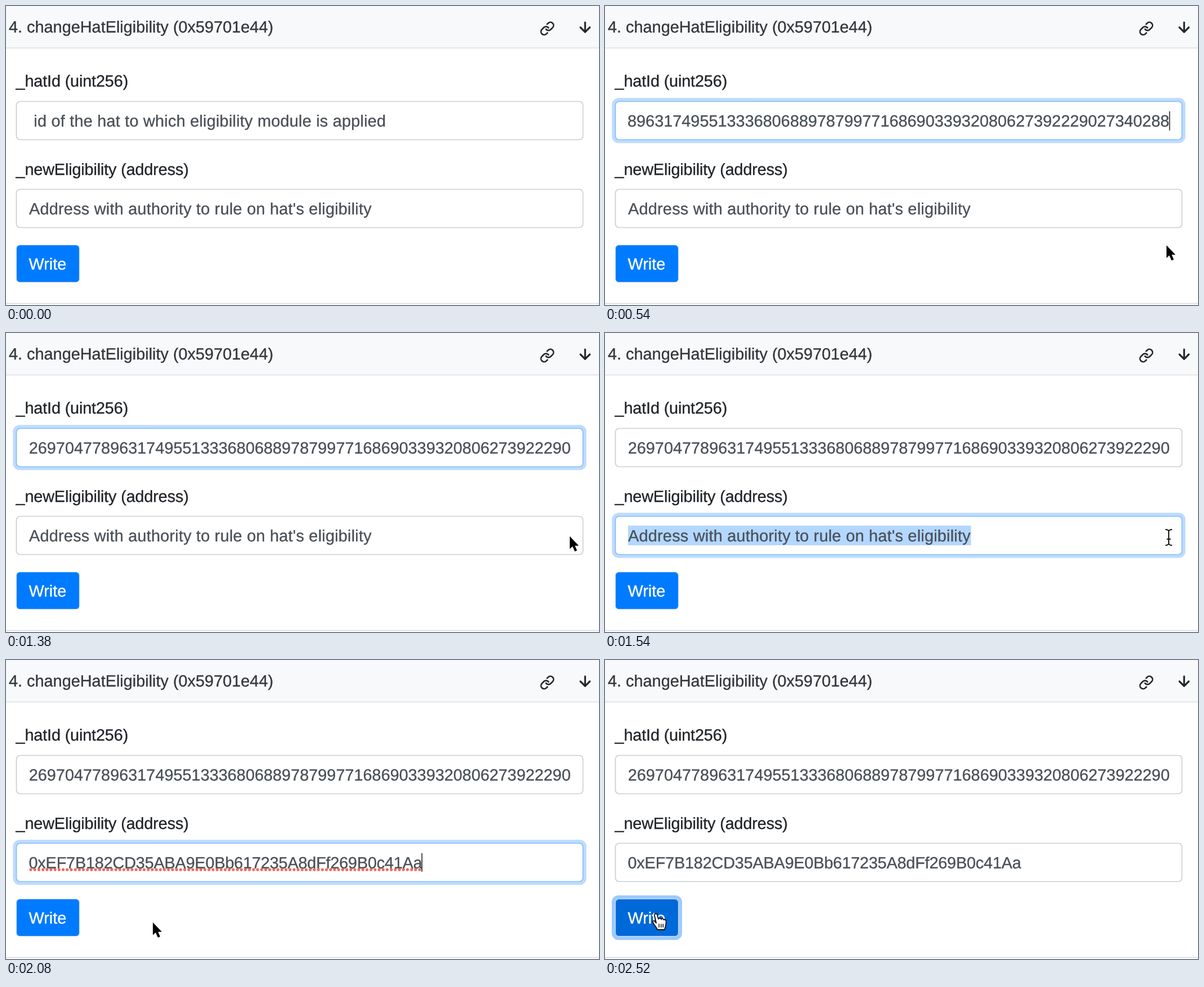
An HTML page that plays this animation: 1054x531 px, repeating every 2.66 s.

```html
<!DOCTYPE html>
<html lang="en">
<head>
<meta charset="utf-8">
<title>changeHatEligibility</title>
<style>
  html, body { margin: 0; width: 100%; height: 100%; overflow: hidden; background: #fff; }
  svg { display: block; }
  text {
    font: 28.87px "Liberation Sans", Arial, sans-serif;
    color: #212529; fill: currentColor; stroke: currentColor; stroke-width: .35;
    white-space: pre; text-rendering: geometricPrecision;
  }
  .title { color: #33373b; }
  .label { letter-spacing: -.16px; }
  .value, .hint, .hex { color: #495057; }
  .hint { letter-spacing: .225px; }
  .hex { letter-spacing: -.2px; }
  .write { color: #fff; }
  .icon { fill: none; stroke: #24282c; stroke-linecap: round; stroke-linejoin: round; }
  .box { fill: #fff; stroke: #cbced2; stroke-width: 1.7; }
  .box.on { stroke: #80bdff; }
  .ring { fill: #bfdbfd; }
  .mark { fill: #b3d7ff; }
  .caret { stroke: #222; stroke-width: 1.6; }
  .off { display: none; }
</style>
</head>
<body>
<svg width="1054" height="531" viewBox="0 0 1054 531">
  <defs>
    <path id="beamLine" d="M-6-14q5 0 6 3q1-3 6-3M-6 14q5 0 6-3q1 3 6 3M0-11V11M-3.5 3H3.5"/>
  </defs>
  <rect width="1054" height="74" fill="#f8f9fb"/>
  <path d="M0 74.5H1054M0 528.3H1054" stroke="#dcdddf" stroke-width="1.7"/>
  <text class="title" x="5" y="46.5">4. changeHatEligibility (0x59701e44)</text>
  <g class="icon" transform="translate(948.6 26.6) scale(1.12)" stroke-width="2.4">
    <path d="M10 13a5 5 0 0 0 7.54.54l3-3a5 5 0 0 0-7.07-7.07l-1.72 1.71M14 11a5 5 0 0 0-7.54-.54l-3 3a5 5 0 0 0 7.07 7.07l1.71-1.71"/>
  </g>
  <path class="icon" d="M1029.3 29V46M1021 38l8.3 8.3 8.3-8.3" stroke-width="3.2"/>

  <text class="label" x="17.5" y="143">_hatId (uint256)</text>
  <rect id="ring1" class="ring" x="12.3" y="163.3" width="1019.4" height="80.2" rx="12"/>
  <rect id="box1" class="box" x="18.5" y="169.5" width="1007" height="68" rx="6.5"/>
  <rect id="mark1" class="mark" x="41" y="186.5" width="635" height="34.5"/>
  <text id="hint1" class="hint" x="41" y="214"> id of the hat to which eligibility module is applied</text>
  <svg x="40" y="170" width="964.5" height="67">
    <text id="head" class="value" x=".7" y="44"></text>
    <text id="tail" class="value" x="963" y="44" text-anchor="end"></text>
  </svg>
  <path id="caret1" class="caret" d="M1003.5 187V221"/>

  <text class="label" x="17.5" y="299.5">_newEligibility (address)</text>
  <rect id="ring2" class="ring" x="12.3" y="319.3" width="1019.4" height="80.2" rx="12"/>
  <rect id="box2" class="box" x="18.5" y="325.5" width="1007" height="68" rx="6.5"/>
  <rect id="mark2" class="mark" x="41" y="342" width="609.5" height="35"/>
  <text id="hint2" class="hint" x="41" y="369.5">Address with authority to rule on hat's eligibility</text>
  <text id="hex" class="hex" x="40.5" y="369.5">0xEF7B182CD35ABA9E0Bb617235A8dFf269B0c41Aa</text>
  <g id="spell">
    <path d="M44 372.3H737" stroke="#f4695f" stroke-width="5.2" stroke-linecap="round" stroke-dasharray="0 7.2"/>
    <path class="caret" d="M739.3 343V376"/>
  </g>

  <rect id="ring3" x="12" y="418" width="125" height="79.3" rx="12" fill="#9dcaff"/>
  <rect id="button" x="18.5" y="424.5" width="112" height="66.2" rx="6" stroke="#c9dcf0" stroke-width="1.2"/>
  <text class="write" x="40.5" y="468">Write</text>

  <path id="arrow" d="M0 0V22.5L5 18 9 27 13 25.3 9.2 16.7H16Z" stroke="#fff" stroke-width="3" paint-order="stroke"/>
  <g id="beam" fill="none">
    <use href="#beamLine" stroke="#fff" stroke-width="4"/>
    <use href="#beamLine" stroke="#111" stroke-width="2"/>
  </g>
  <g id="hand" fill="#fff" stroke="#111" stroke-width="1.8" stroke-linejoin="round">
    <path d="M-3 3C-4-1 1-2 2 2L4 9C5 7 8 7 9 9.5 10 7.5 13 8 13.5 10.5 15 9.5 17.5 10 17.5 13 18 20 16 22 15 28H2C1 24-4 19-6 15-7 12-4 11-2 14L0 16Z"/>
    <path d="M5 17.5v6.5M8.7 17.5v6.5M12.3 17.5v6.5" stroke-width="1.5"/>
  </g>
</svg>
<script>
const LOOP = 2660;
const $ = id => document.getElementById(id);
const show = (id, on) => $(id).classList.toggle('off', !on);

// 68 digits: the field shows the first or the last 60
$('head').textContent = $('tail').textContent =
  '269704778963174955133368068897' + '879977168690339320806273922290' + '27340288';

// time, focus (1, 2 = fields, 3 = button), hat field, address field, cursor, x, y
const steps = [
  [0, 0, 'hint', 'hint'],
  [80, 0, 'hint', 'hint', 'arrow', 1031, 440],
  [160, 0, 'hint', 'hint', 'arrow', 1018, 310],
  [230, 1, 'hint', 'hint', 'beam', 1009, 213],
  [310, 1, 'marked', 'hint', 'beam', 1009, 213],
  [460, 1, 'tail', 'hint', 'beam', 1009, 213],
  [540, 1, 'tail', 'hint', 'arrow', 998, 425],
  [620, 1, 'tail', 'hint'],
  [770, 0, 'head', 'hint'],
  [850, 1, 'head', 'hint', 'arrow', 1010, 130],
  [920, 1, 'head', 'hint', 'arrow', 1006, 330],
  [1230, 1, 'head', 'hint', 'arrow', 1005, 342],
  [1310, 1, 'head', 'hint', 'arrow', 1003, 355],
  [1380, 1, 'head', 'hint', 'arrow', 1002, 361],
  [1460, 2, 'head', 'hint', 'beam', 1002, 363],
  [1540, 2, 'head', 'marked', 'beam', 1002, 363],
  [1770, 2, 'head', 'hex', 'beam', 1002, 363],
  [1920, 2, 'head', 'hex', 'arrow', 800, 430],
  [2000, 2, 'head', 'hex', 'arrow', 470, 474],
  [2080, 2, 'head', 'hex', 'arrow', 261, 466],
  [2150, 2, 'head', 'hex', 'arrow', 160, 458],
  [2230, 2, 'head', 'hex', 'hand', 105, 452],
  [2300, 2, 'head', 'hex', 'hand', 91, 451],
  [2380, 3, 'head', 'hex', 'hand', 91, 451]
];

function draw(t) {
  const [, focus, hat, addr, cursor, x, y] = steps.findLast(s => s[0] <= t);
  for (const n of [1, 2, 3]) show('ring' + n, focus === n);
  for (const n of [1, 2]) $('box' + n).classList.toggle('on', focus === n);
  show('hint1', hat === 'hint' || hat === 'marked');
  show('mark1', hat === 'marked');
  show('head', hat === 'head');
  show('tail', hat === 'tail');
  show('caret1', hat === 'tail');
  show('hint2', addr !== 'hex');
  show('mark2', addr === 'marked');
  show('hex', addr === 'hex');
  show('spell', addr === 'hex' && focus === 2);
  $('button').setAttribute('fill', cursor === 'hand' ? '#0069d9' : '#007bff');
  for (const c of ['arrow', 'beam', 'hand']) show(c, c === cursor);
  if (cursor) $(cursor).setAttribute('transform', `translate(${x} ${y})`);
}

const start = performance.now();
function tick() {
  draw((performance.now() - start) % LOOP);
  requestAnimationFrame(tick);
}
tick();
</script>
</body>
</html>
```
